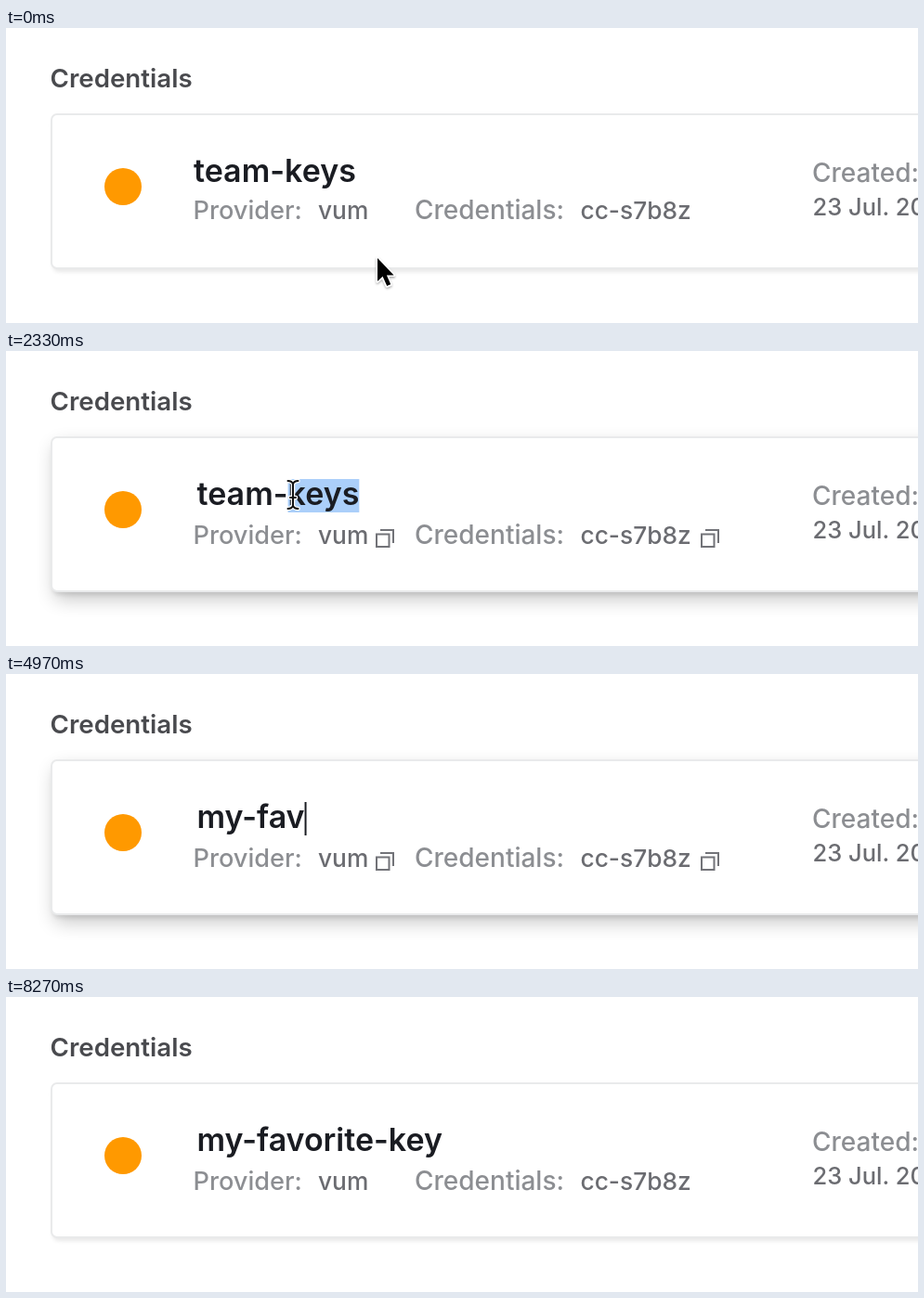
An HTML page for the animation above (8710 ms loop, 982 by 318 pixels).

```html
<!DOCTYPE html>
<html lang="en">
<head>
<meta charset="utf-8">
<title>Rename credentials</title>
<style>
  html, body { margin: 0; width: 100%; height: 100%; overflow: hidden; background: #fff; }
  svg { display: block; width: 100%; height: 100%; }
  text { font-family: Inter, "Open Sans", sans-serif; white-space: pre; }
  .heading { font-size: 27.7px; font-weight: 600; fill: #494a4e; }
  .title { font-size: 34px; font-weight: 600; fill: #1a1c22; }
  .label { font-size: 28px; font-weight: 450; fill: #8c8e92; }
  .value { font-size: 26.3px; font-weight: 500; fill: #6b6c71; }
  .small { font-size: 27.2px; }
  .date { font-size: 25.5px; }
</style>
</head>
<body>
<svg viewBox="0 0 982 318" preserveAspectRatio="xMidYMid meet">
  <defs>
    <filter id="soft" x="-10%" y="-30%" width="120%" height="160%"><feGaussianBlur stdDeviation="10"/></filter>
    <filter id="tight" x="-5%" y="-10%" width="110%" height="120%"><feGaussianBlur stdDeviation="2"/></filter>
    <filter id="drop" x="-50%" y="-50%" width="200%" height="200%">
      <feDropShadow dx="0" dy="1.5" stdDeviation="1.3" flood-opacity=".35"/>
    </filter>
    <path id="copy" d="M1 5.5H14.5V19H1Z M5 1H19V15" fill="none" stroke="#727378" stroke-width="2"/>
    <path id="stem" d="M-5.5 -15Q-1 -15 0 -11.5Q1 -15 5.5 -15M0 -11.5V11.5M-5.5 15Q-1 15 0 11.5Q1 15 5.5 15M-3 3H3"/>
  </defs>

  <rect width="982" height="318" fill="#fff"/>
  <text class="heading" x="47.5" y="64">Credentials</text>

  <rect x="50" y="97" width="1000" height="166" rx="7" opacity=".09" filter="url(#tight)"/>
  <rect id="lift" x="52" y="101" width="1000" height="167" rx="7" opacity="0" filter="url(#soft)"/>
  <rect x="49" y="93" width="1000" height="166" rx="6" fill="#fff" stroke="#e9eaeb" stroke-width="2"/>

  <circle cx="126" cy="171" r="20" fill="#ff9900"/>
  <rect id="mark" y="138" height="36" fill="#abcffa"/>
  <text id="title" class="title" y="166"></text>
  <rect id="caret" y="138" width="2" height="36" fill="#1a1c22"/>

  <g id="meta">
    <text class="label small" x="201.5" y="206">Provider:</text>
    <text class="value" x="336" y="206">vum</text>
    <text class="label" x="440" y="206">Credentials:</text>
    <text class="value" x="618.5" y="206">cc-s7b8z</text>
  </g>
  <g id="icons">
    <use href="#copy" x="398" y="192"/>
    <use href="#copy" x="748" y="192"/>
  </g>
  <text class="label" x="868" y="166">Created:</text>
  <text class="value date" x="868.5" y="202">23 Jul. 20</text>

  <g id="arrow" filter="url(#drop)">
    <path d="M0 0V25L5.6 19.8L10.2 30L14.2 28.3L9.9 18.4H17.6Z" stroke="#fff" stroke-width="3" stroke-linejoin="round" paint-order="stroke"/>
  </g>
  <g id="beam" fill="none" stroke-linecap="round">
    <use href="#stem" stroke="#fff" stroke-width="4.5"/>
    <use href="#stem" stroke="#111" stroke-width="2"/>
  </g>
</svg>
<script>
const LOOP = 8710;
const HOVER = 1030, CLICK = 1900, WORD = 2070, CLEAR = 3100, ALL = 3600, TYPE = 4000, LEAVE = 7000;
const el = id => document.getElementById(id);
const [lift, mark, title, caret, meta, icons, arrow, beam] =
  ["lift", "mark", "title", "caret", "meta", "icons", "arrow", "beam"].map(el);

// Pointer moves: start, end, target x, target y
const moves = [
  [0, 270, 390, 196],
  [500, 670, 353, 161],
  [1000, 1870, 309, 155],
  [2330, 3060, 390.5, 152]
];

// Key presses; "<" deletes one character
const keys = [
  [4000, "m"], [4100, "y"], [4600, "-"], [4700, "f"], [4800, "a"],
  [4970, "v"], [5100, "o"], [5270, "r"], [5370, "i"], [5470, "t"],
  [5600, "e"], [5730, "-"], [6000, "<"], [6100, "<"],
  [6300, "e"], [6430, "-"], [6600, "k"], [6700, "e"], [6770, "y"]
];

const ramp = (t, a, b) => Math.min(1, Math.max(0, (t - a) / (b - a)));
const ease = p => p * p * (3 - 2 * p);
const show = (node, on) => node.setAttribute("visibility", on ? "visible" : "hidden");

function pointer(t) {
  let x = 400, y = 248;
  for (const [a, b, tx, ty] of moves) {
    const p = ease(ramp(t, a, b));
    x += (tx - x) * p;
    y += (ty - y) * p;
  }
  return `translate(${x} ${y})`;
}

function typed(t) {
  if (t < TYPE) return { text: "team-keys", last: CLEAR };
  let text = "", last = TYPE;
  for (const [at, key] of keys) {
    if (at > t) break;
    text = key === "<" ? text.slice(0, -1) : text + key;
    last = at;
  }
  return { text, last };
}

const widthTo = n => n ? title.getSubStringLength(0, n) : 0;

// Index of the first selected character, or -1
function selection(t) {
  if (t >= WORD && t < CLEAR) return 5;
  if (t >= ALL && t < TYPE) return 0;
  return -1;
}

function draw(t) {
  const editing = t >= HOVER;
  const left = editing ? 205.5 : 202;
  const { text, last } = typed(t);
  if (title.textContent !== text) title.textContent = text;
  title.setAttribute("x", left);
  meta.setAttribute("transform", `translate(0 ${editing ? 2 : 0})`);

  const hover = ease(ramp(t, 1000, 1330)) * (1 - ease(ramp(t, LEAVE, 7400)));
  lift.setAttribute("opacity", 0.21 * hover);
  show(icons, editing && t < LEAVE + 30);

  const from = selection(t);
  show(mark, from >= 0);
  if (from >= 0) {
    const start = widthTo(from);
    mark.setAttribute("x", left + start);
    mark.setAttribute("width", widthTo(text.length) - start);
  }

  const clicked = t >= CLICK && t < WORD;
  const blinkOff = t >= 6230 && t < 6300;
  const active = t >= CLEAR && from < 0 && !blinkOff && (t - last) % 1000 < 500;
  show(caret, clicked || active);
  caret.setAttribute("x", left + widthTo(clicked ? 5 : text.length));

  const at = pointer(t);
  arrow.setAttribute("transform", at);
  beam.setAttribute("transform", at);
  show(arrow, !editing);
  show(beam, editing && t < TYPE);
}

const began = performance.now();
function tick() {
  draw((performance.now() - began) % LOOP);
  requestAnimationFrame(tick);
}
tick();
</script>
</body>
</html>
```
